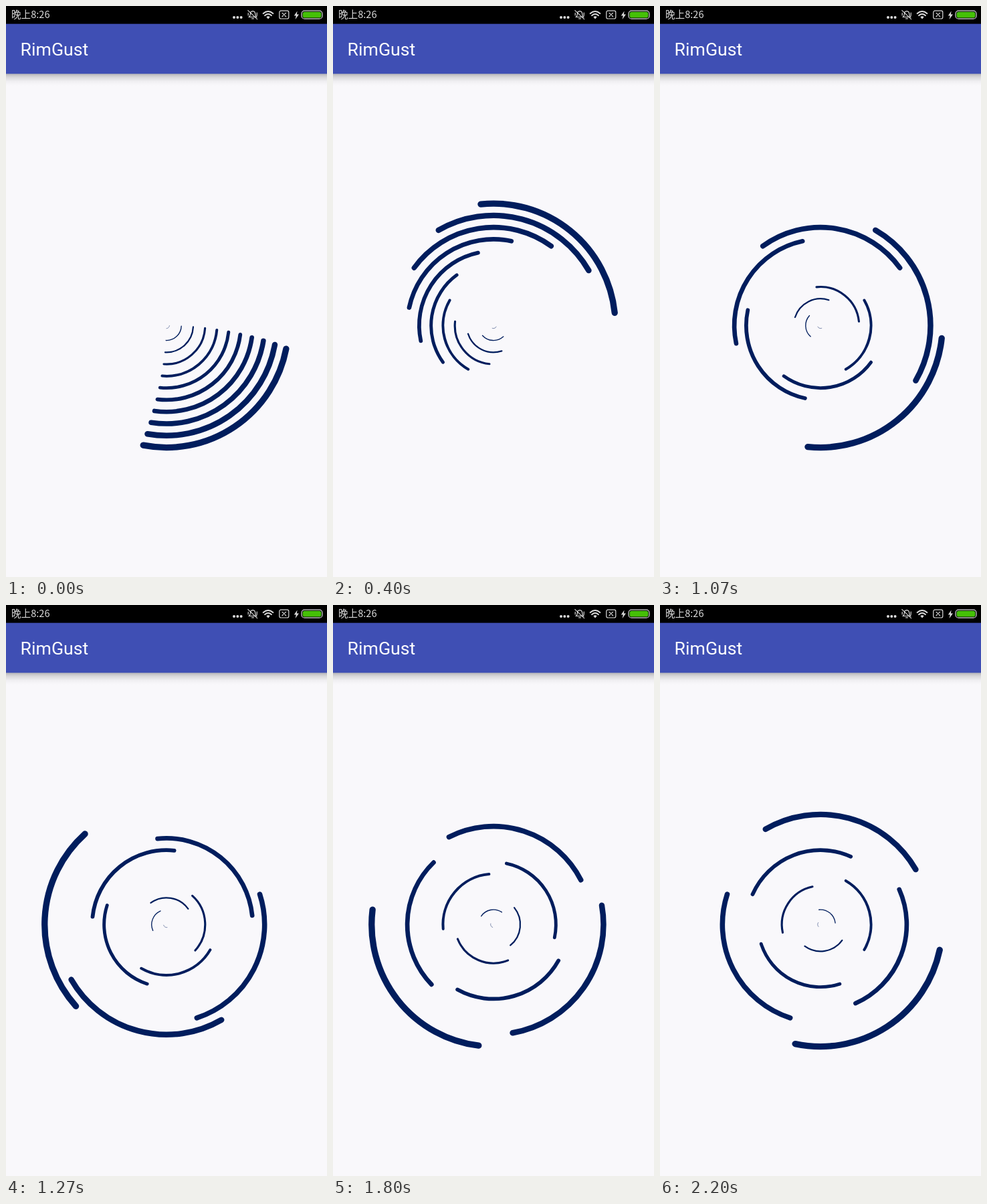
Write an HTML page that moves like this. It is 480 px wide and 853 px high and loops after 2.27 s.

```html
<!DOCTYPE html>
<html lang="zh">
<head>
<meta charset="utf-8">
<title>RimGust</title>
<style>
  html, body { margin: 0; width: 100%; height: 100%; overflow: hidden; background: #f9f8fb; }
  svg { display: block; width: 100%; height: 100%; }
  .clock { font: 14.6px "Noto Sans CJK SC", "Noto Sans CJK", "Noto Sans CJK JP", sans-serif; fill: #dcdcdc; }
  .title { font: 26.67px Roboto, sans-serif; fill: #fff; }
</style>
</head>
<body>
<svg viewBox="0 0 480 853">
  <defs>
    <linearGradient id="shade" x1="0" y1="0" x2="0" y2="1">
      <stop offset="0" stop-color="#000" stop-opacity=".27"/>
      <stop offset=".3" stop-color="#000" stop-opacity=".13"/>
      <stop offset=".65" stop-color="#000" stop-opacity=".035"/>
      <stop offset="1" stop-color="#000" stop-opacity="0"/>
    </linearGradient>
  </defs>
  <rect width="480" height="853" fill="#f9f8fb"/>
  <rect y="101" width="480" height="18" fill="url(#shade)"/>
  <rect y="26" width="480" height="75.3" fill="#3f4fb4"/>
  <rect width="480" height="26.67" fill="#000"/>

  <text class="clock" x="8" y="18.3">晚上8:26</text>
  <text class="title" x="21.6" y="74.2">RimGust</text>

  <!-- status icons -->
  <g fill="#dcdcdc">
    <circle cx="341" cy="17" r="2"/>
    <circle cx="346.3" cy="17" r="2"/>
    <circle cx="351.6" cy="17" r="2"/>
    <path d="M435.6 7.5L430.8 14.6H433.8L432.6 20L438 12.5H434.8Z"/>
    <path d="M392 19.5L389.3 16.3Q392 14.2 394.7 16.3Z"/>
  </g>
  <g fill="none" stroke="#dcdcdc" stroke-width="1.2" stroke-linecap="round">
    <path d="M363.5 16.5Q365.3 15 365.3 12Q365.5 7.8 369 7.6Q372.5 7.8 372.7 12Q372.7 15 374.5 16.5ZM367.5 18.8H370.5M361.8 6.6L375.6 19.6M362.2 10.5V14M375.2 10V14.5"/>
    <path d="M384.6 11.2Q392 4.8 399.4 11.2M387 14.2Q392 9.8 397 14.2" stroke-width="1.9"/>
    <rect x="408.8" y="7.2" width="14" height="11.8" rx="2.2"/>
    <path d="M413 10.4L418.6 15.8M418.6 10.4L413 15.8"/>
    <rect x="442" y="7.2" width="31" height="12" rx="4.5"/>
  </g>
  <rect x="443.6" y="8.8" width="27.8" height="8.8" rx="3.2" fill="#45c006"/>

  <g id="wind" transform="translate(240 477.33)" fill="none" stroke="#001d5d" stroke-linecap="round"/>
</svg>
<script>
  const LOOP = 2270, RINGS = 11, SCALE = 2.25;
  // [step, angle in degrees] of the innermost ring; ring k turns k + 1 times as fast
  const pace = [[0, 1], [6, 24], [11, 44], [16, 66], [22, 90], [27, 107], [32, 126], [33, 132]];
  const wind = document.getElementById("wind");

  const rings = Array.from({ length: RINGS }, (_, k) => {
    const r = (10 + 40 * k) / SCALE;
    const arc = document.createElementNS("http://www.w3.org/2000/svg", "path");
    arc.setAttribute("d", `M${r} 0A${r} ${r} 0 0 1 0 ${r}`);
    arc.setAttribute("stroke-width", (2 * k + 1) / SCALE);
    return wind.appendChild(arc);
  });

  // The picture advances 15 times a second, on 10 ms ticks.
  const stepAt = ms => Math.floor((Math.floor(ms / 10) + 0.5) * 0.15);

  function angleAt(step) {
    const i = Math.max(1, pace.findIndex(p => p[0] >= step));
    const [s0, a0] = pace[i - 1], [s1, a1] = pace[i];
    return Math.round(a0 + (a1 - a0) * (step - s0) / (s1 - s0));
  }

  function draw(ms) {
    const angle = angleAt(stepAt(ms % LOOP));
    rings.forEach((arc, k) => arc.setAttribute("transform", `rotate(${angle * (k + 1) % 360})`));
  }

  const start = performance.now();
  function tick() {
    draw(performance.now() - start);
    requestAnimationFrame(tick);
  }
  tick();
</script>
</body>
</html>
```
